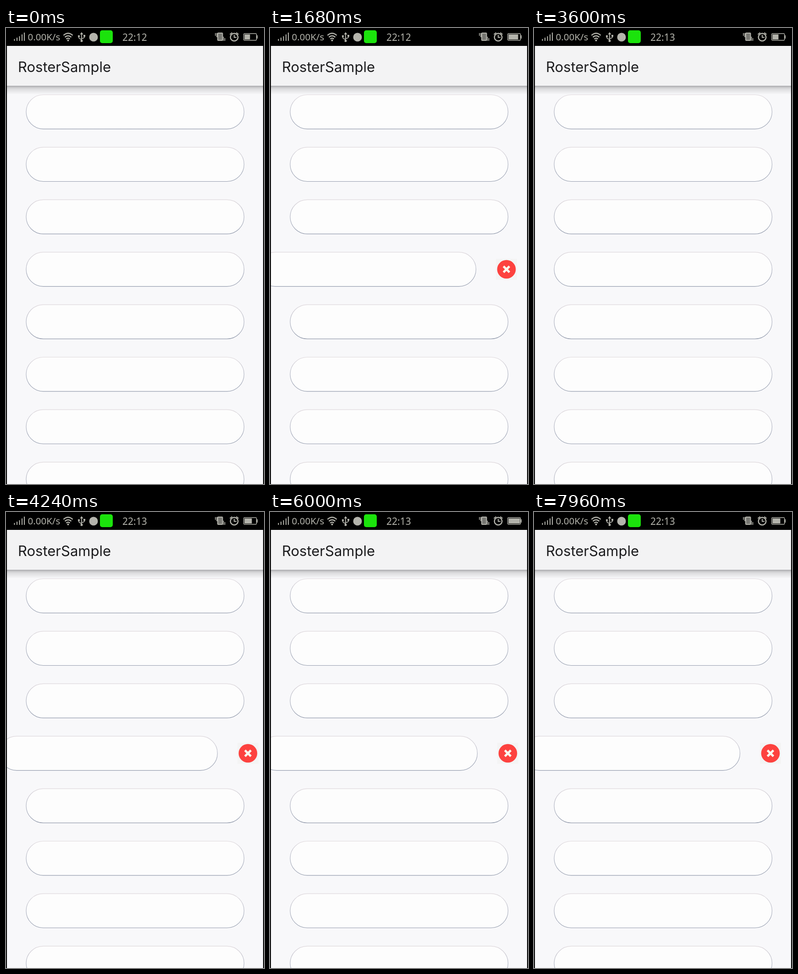
Write an HTML page that moves like this. It is 563 px wide and 994 px high and loops after 8 s.

```html
<!DOCTYPE html>
<html lang="en">
<head>
<meta charset="utf-8">
<title>RosterSample</title>
<style>
html, body { margin: 0; width: 100%; height: 100%; overflow: hidden; background: #000; }
svg { display: block; width: 100%; height: 100%; }
.status { font-family: "Noto Sans", sans-serif; fill: #b4b4ac; }
.title { font: 31px Inter, sans-serif; fill: #1d1d1f; }
.line { fill: none; stroke: #b4b4ac; stroke-width: 2; }
.solid { fill: #b4b4ac; }

.swipe { animation: swipe 8s linear infinite; }
.level { animation: charge 8s infinite; }
.before, .after { animation: minute 8s step-end infinite; }
.after { animation-name: next-minute; }

@keyframes swipe {
  0%, 8% { transform: translateX(0); animation-timing-function: ease-in; }
  13% { transform: translateX(-20px); }
  16% { transform: translateX(-62px); animation-timing-function: ease-out; }
  17.5%, 25.5% { transform: translateX(-70px); animation-timing-function: ease-in; }
  28% { transform: translateX(-40px); }
  30.5% { transform: translateX(-5px); animation-timing-function: ease-out; }
  31.5%, 49.5% { transform: translateX(0); animation-timing-function: ease-in; }
  53% { transform: translateX(-58px); animation-timing-function: ease-out; }
  55% { transform: translateX(-69px); animation-timing-function: ease-in; }
  61% { transform: translateX(-47px); animation-timing-function: ease-out; }
  65% { transform: translateX(-24px); animation-timing-function: ease-in-out; }
  70.5%, 73% { transform: translateX(-70px); animation-timing-function: ease-in; }
  75% { transform: translateX(-67px); animation-timing-function: ease-in-out; }
  81% { transform: translateX(-30px); animation-timing-function: ease-in-out; }
  87%, 100% { transform: translateX(-70px); }
}
@keyframes charge {
  0% { width: 12px; animation-timing-function: step-end; }
  1% { width: 13px; animation-timing-function: steps(13); }
  33.5% { width: 26px; animation-timing-function: step-end; }
  40% { width: 11px; animation-timing-function: steps(14); }
  75% { width: 25px; animation-timing-function: step-end; }
  84.5% { width: 12px; animation-timing-function: steps(6); }
  99.5%, 100% { width: 17px; }
}
@keyframes minute { 0% { opacity: 1; } 22%, 100% { opacity: 0; } }
@keyframes next-minute { 0% { opacity: 0; } 22%, 100% { opacity: 1; } }
</style>
</head>
<body>
<svg viewBox="0 0 563 994" preserveAspectRatio="none">
  <defs>
    <linearGradient id="edge" x1="0" y1="0" x2="0" y2="1">
      <stop offset="0" stop-color="#dfd9dd"/>
      <stop offset=".5" stop-color="#b5b9c6"/>
      <stop offset="1" stop-color="#959dae"/>
    </linearGradient>
    <linearGradient id="shade" x1="0" y1="0" x2="0" y2="1">
      <stop offset="0" stop-color="#000" stop-opacity=".28"/>
      <stop offset=".35" stop-color="#000" stop-opacity=".11"/>
      <stop offset="1" stop-color="#000" stop-opacity="0"/>
    </linearGradient>
    <rect id="pill" x="44" y="145.5" width="475.5" height="74.6" rx="37.3" fill="#fdfdfd" stroke="url(#edge)" stroke-width="1.2"/>
  </defs>

  <rect x="2" y="39" width="559" height="955" fill="#f8f8fa"/>

  <use href="#pill"/>
  <use href="#pill" y="114.4"/>
  <use href="#pill" y="228.8"/>
  <g class="swipe">
    <use href="#pill" y="343.2"/>
    <rect x="563" y="503" width="46" height="46" fill="#f4f4f4"/>
    <circle cx="586" cy="526" r="20.3" fill="#fd423f"/>
    <path d="M579.5 519.5l13 13m0-13l-13 13" stroke="#fbf8ee" stroke-width="4.8"/>
  </g>
  <use href="#pill" y="457.6"/>
  <use href="#pill" y="572"/>
  <use href="#pill" y="686.4"/>
  <use href="#pill" y="800.8"/>

  <rect x="2" y="126" width="559" height="19" fill="url(#shade)"/>
  <rect x="2" y="39" width="559" height="87" fill="#f3f3f4"/>
  <path d="M2 126.5h559" stroke="#a3a3a6"/>
  <text class="title" x="26" y="95.5">RosterSample</text>

  <path d="M0 0h563v39H0zM0 39h2v955H0zM561 39h2v955h-2z"/>

  <path class="line" stroke-width="3" d="M18.5 28v-4M24 28v-7M29.5 28v-10M35 28v-14M40 28v-18"/>
  <text class="status" x="47.5" y="27" font-size="20.5">0.00K/s</text>

  <g class="line">
    <path d="M125.5 16q10-9 20 0M128.5 20q7-6 14 0M131.5 24q4-3.500 8 0" stroke-width="2.4"/>
    <path d="M165 13v14M159 18v3q0 2 6 4M171 17v3q0 2-6 3" stroke-width="1.8"/>
  </g>
  <circle class="solid" cx="135.500" cy="27" r="2"/>
  <path class="solid" d="M165 9l3.500 5h-7zM157 16h4v3.500h-4zM169 15h4v4h-4z"/>
  <circle class="solid" cx="165" cy="28" r="2.500"/>
  <circle class="solid" cx="191" cy="20" r="9.500"/>
  <rect x="205" y="5" width="28" height="28" rx="5" fill="#1be30c"/>

  <g class="status" font-size="21">
    <text class="before" x="254" y="27.500">22:12</text>
    <text class="after" x="254" y="27.500">22:13</text>
  </g>

  <rect x="462" y="11" width="10.500" height="16" rx="1" fill="#777772" stroke="#b4b4ac" stroke-width="2"/>
  <path class="line" style="stroke-width:1.6" d="M457 11v6M460 11v9M474.500 19v9M477.500 22v6"/>

  <circle class="line" cx="498" cy="20" r="8.300" style="stroke-width:2.500"/>
  <path class="line" d="M498 15v5.500h5M488.500 14l5-4M507.500 14l-5-4"/>

  <rect x="518.700" y="12.200" width="28" height="14.600" rx="2" class="line" style="stroke-width:1.400"/>
  <rect class="solid" x="547" y="16" width="2" height="7"/>
  <rect class="solid level" x="520.500" y="14" width="12" height="11"/>
</svg>
</body>
</html>
```
